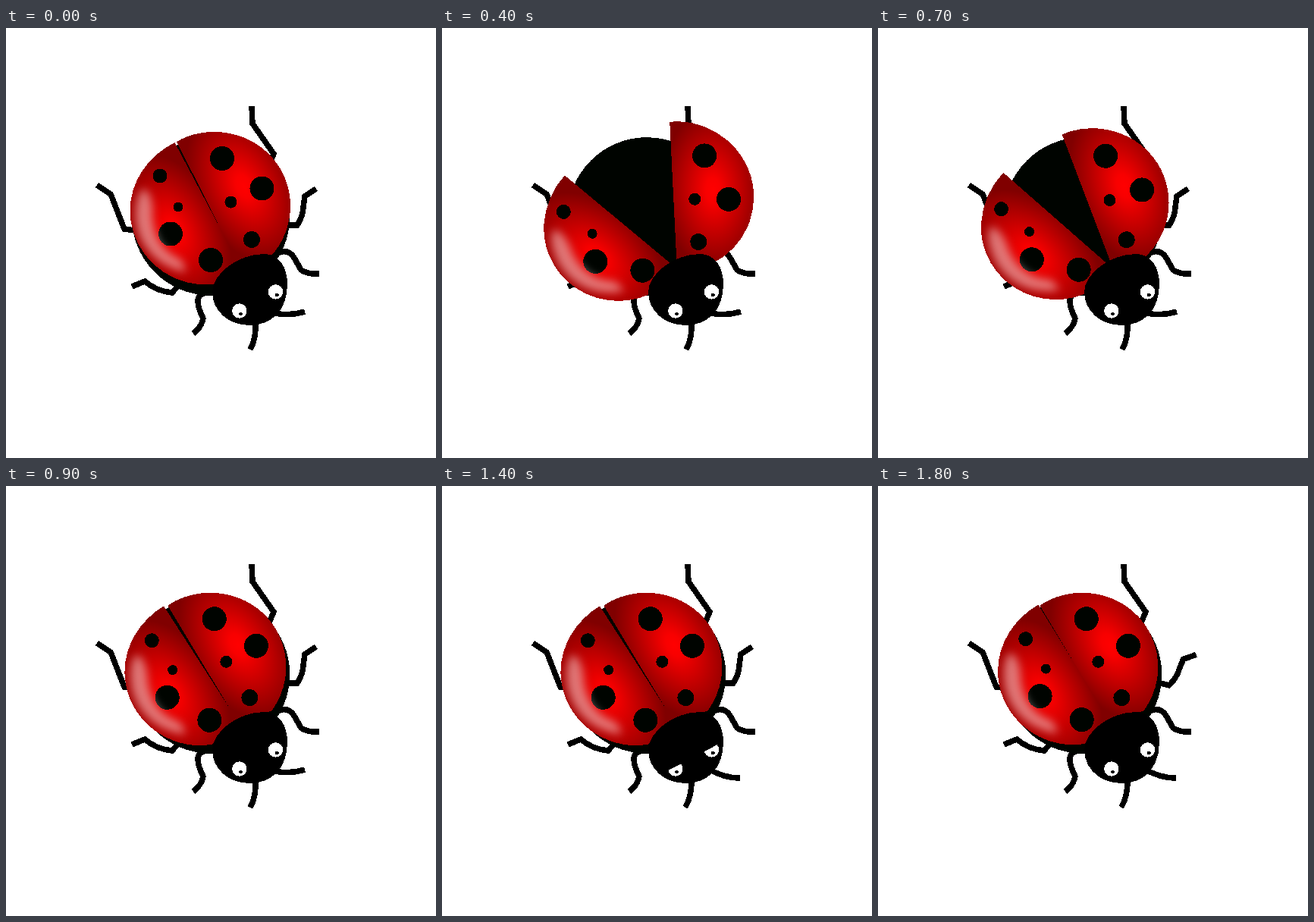
These frames come from a looping animation (567x567 px, 1.9 s). An HTML page:

```html
<!DOCTYPE html>
<html lang="en">
<head>
<meta charset="utf-8">
<title>Ladybird</title>
<style>
  html, body { margin: 0; width: 100%; height: 100%; overflow: hidden; background: #fff; }
  svg { display: block; width: 100%; height: 100%; shape-rendering: crispEdges; }
  .limbs { fill: none; stroke: #000; stroke-width: 7.5; }
  .spots { fill: #000400; }
</style>
</head>
<body>
<svg viewBox="0 0 567 567">
  <defs>
    <radialGradient id="red" gradientUnits="userSpaceOnUse" cx="0" cy="0" r="1">
      <stop offset="0" stop-color="#f00"/>
      <stop offset=".15" stop-color="#f80000"/>
      <stop offset="1" stop-color="#800000"/>
    </radialGradient>
    <radialGradient id="redL" href="#red" gradientTransform="translate(221 267) rotate(-27) scale(66 106)"/>
    <radialGradient id="redR" href="#red" gradientTransform="translate(314 209) rotate(-27) scale(66 106)"/>
    <filter id="soft" x="-40%" y="-40%" width="180%" height="180%">
      <feGaussianBlur stdDeviation="6"/>
    </filter>
    <path id="shell" d="M222.5 151C188 168 163.5 202 163.5 241C163.5 294 208 338 262 338.5C285 338.5 302 331 308.5 313Z"/>
    <clipPath id="clip"><use href="#shell"/></clipPath>
    <g id="eye">
      <circle r="9.7" fill="#fff"/>
      <circle cx="1.8" cy="4" r="2.4"/>
      <rect id="lid" x="-11" y="-11" width="22" transform="rotate(-27)"/>
    </g>
  </defs>

  <g class="limbs">
    <path d="M120 207L138 219L156 265L170 267"/>
    <path d="M166 341L183 334Q198 347 219 349L226 341"/>
    <path d="M247 403Q258 394 260 383Q253 369 253 360Q253 351 262 350"/>
    <path d="M324 103L325 126L353 166L347 180"/>
    <path id="leg" d="M368 260L384 260Q392 247 392 236L394 222L409 212"/>
    <path d="M358 297C368 292 375 295 380 303L389 319Q398 325 413 324"/>
    <path id="feelerR" d="M354 376Q374 380 394 374"/>
    <path id="feelerL" d="M329 388Q330 410 322 424"/>
  </g>

  <circle cx="270" cy="248.5" r="104.3" fill="#000400"/>

  <g id="wingL">
    <use href="#shell" fill="url(#redL)"/>
    <g class="spots">
      <circle cx="203" cy="195" r="9.5"/>
      <circle cx="227" cy="236" r="6.5"/>
      <circle cx="217" cy="271.5" r="16"/>
      <circle cx="270" cy="306" r="16"/>
    </g>
    <g clip-path="url(#clip)">
      <path filter="url(#soft)" fill="#fff" fill-opacity=".46"
        d="M179 213C161 240 168 307 236 322Q236 310 228 304C203 293 191 268 193 236Q190 212 179 213Z"/>
    </g>
  </g>
  <g id="wingR">
    <path fill="url(#redR)" d="M225 150C240 141 257 137 274 137C332 137 375 181 375 235C375 258 367 280 352 298L308 314Z"/>
    <g class="spots">
      <circle cx="285" cy="172" r="16"/>
      <circle cx="337.5" cy="211.5" r="16"/>
      <circle cx="296.5" cy="229.5" r="8"/>
      <circle cx="324" cy="279" r="11"/>
    </g>
  </g>

  <path d="M340 298C360 298 371 315 371 338C371 372 350 392 322 392C292 392 272 372 272 348C272 325 305 298 340 298Z"/>
  <use href="#eye" x="307.8" y="373"/>
  <use href="#eye" x="355.5" y="348"/>
</svg>
<script>
  const STEP = 100, COUNT = 19;
  const $ = id => document.getElementById(id);

  // 0 before a, 1 after b, linear in between
  const ramp = (n, a, b) => Math.min(1, Math.max(0, (n - a) / (b - a)));

  function turn(id, angle, x, y) {
    $(id).setAttribute('transform', `rotate(${angle} ${x} ${y})`);
  }

  function draw(n) {
    const r = (a, b) => ramp(n, a, b);
    // wings open, fold again, then the left one twitches
    const left = -4.8 * r(0, 2) - 26.2 * r(2, 5) + 10.2 * r(5, 7) + 16 * r(7, 9)
      - 11.8 * r(14, 16) + 12.9 * r(16, 18);
    const right = 24 * r(0, 4) - 18 * r(5, 7) - 10.2 * r(7, 9);
    turn('wingL', left, 302, 327);
    turn('wingR', right, 324, 314);
    turn('leg', 30 * r(14, 16) - 16 * r(16, 18), 372, 260);
    turn('feelerR', 18 * r(12, 14), 358, 377);
    turn('feelerL', 2.5 * r(12, 14), 329, 392);
    // blink
    const shut = r(9, 12) - 0.62 * r(12, 14) - 0.38 * r(14, 16);
    $('lid').setAttribute('height', 22 * shut);
  }

  const start = performance.now();
  let shown = -1;
  function tick() {
    const n = Math.floor((performance.now() - start) / STEP) % COUNT;
    if (n !== shown) draw(shown = n);
    requestAnimationFrame(tick);
  }
  tick();
</script>
</body>
</html>
```
